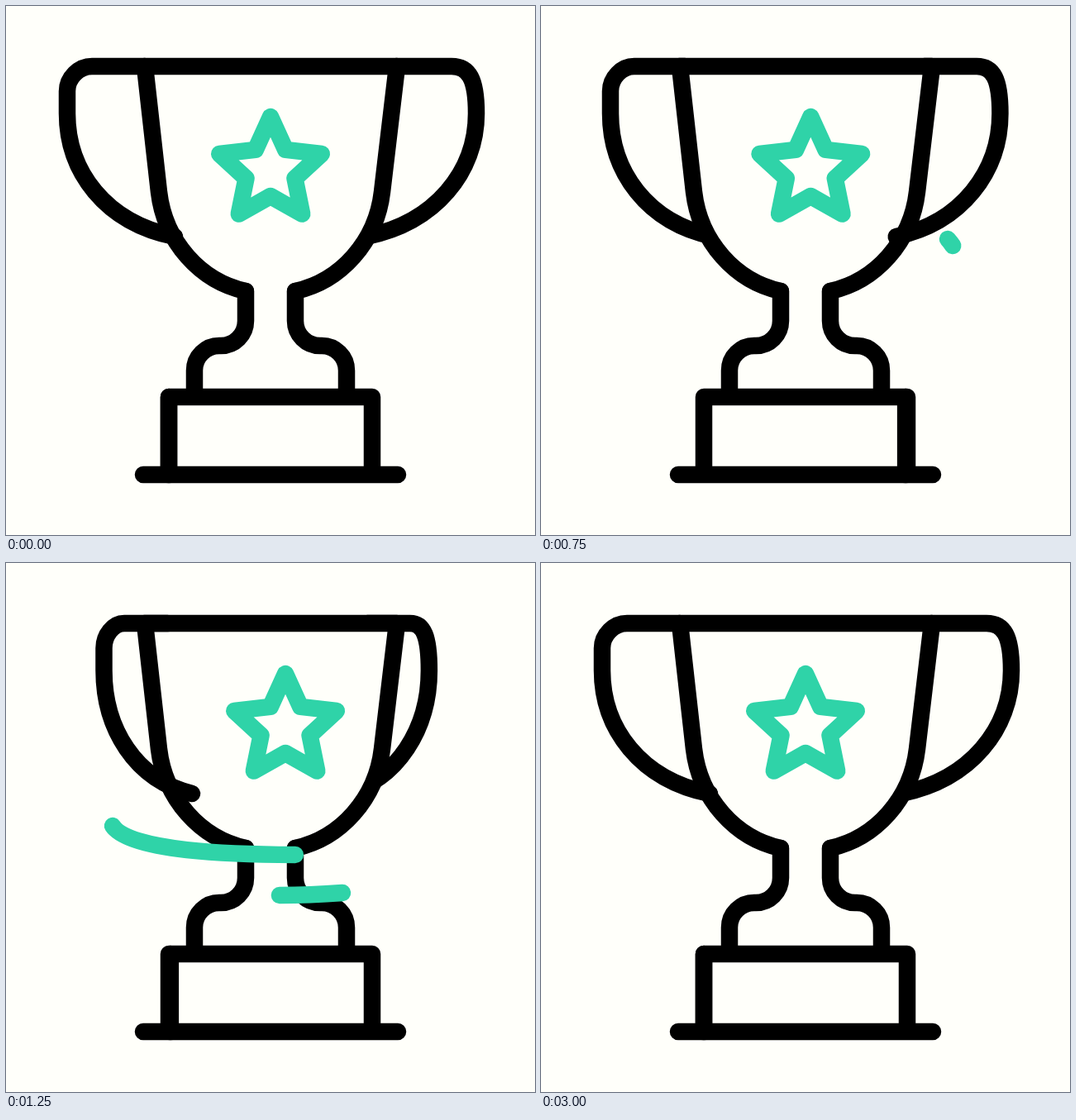
Write an HTML page with a canvas that moves like this. It is 640 px wide and 640 px high and loops after 3080 ms.

```html
<!DOCTYPE html>
<html lang="en">
<head>
<meta charset="utf-8">
<title>Spinning trophy</title>
<style>
  html, body { margin: 0; width: 100%; height: 100%; overflow: hidden; background: #fffffa; }
  canvas { display: block; width: 640px; height: 640px; }
</style>
</head>
<body>
<canvas id="stage" width="640" height="640"></canvas>
<script>
const ctx = document.getElementById('stage').getContext('2d');
const PAPER = '#fffffa', INK = '#000', MINT = '#2fd3a8';
const LOOP = 3080, STEP = 1000 / 12, CX = 320;

const cup = new Path2D('M168 73L185 225C192 285 235 333 290 345H350C405 333 448 285 455 225L473 73Z');
const cupLine = new Path2D('M290 345C235 333 192 285 185 225L168 73H473L455 225C448 285 405 333 350 345');
const stand = new Path2D(
  'M290 345V381A30 30 0 0 1 260 411H258A30 30 0 0 0 228 441V473' +
  'M350 345V381A30 30 0 0 0 380 411H382A30 30 0 0 1 412 441V473' +
  'M197 567V473H443V567M166 567H474');
const upperSwoosh = new Path2D(
  'M492 282C508 300 510 316 490 327C472 338 440 346 415 349C395 351 375 353 355 353C280 353 150 350 129 318');
const lowerSwoosh = new Path2D('M407 399C380 401 355 402 330 402C290 402 260 401 233 397');
const sparkle = new Path2D(
  'M0-45.5A45.5 45.5 0 0 0 45.5 0A45.5 45.5 0 0 0 0 45.5A45.5 45.5 0 0 0-45.5 0A45.5 45.5 0 0 0 0-45.5Z');
const star = new Path2D();
for (let i = 0; i < 10; i++) {
  const r = i % 2 ? 31 : 65, a = i * Math.PI / 5;
  star.lineTo(r * Math.sin(a), -r * Math.cos(a));
}
star.closePath();

// Keys are [step, value, slope]; time is counted in twelfths of a second.
const spinKeys = [[0, 0, 0], [5, 17.5, 10.5], [9, 161, 60], [11, 306, 74], [15, 575, 46], [22, 720, 0]];
const baseKeys = [[0, 0, 0], [5, 28, 15], [9, 170, 55], [11, 302, 66], [15, 550, 50], [22, 720, 0]];
const starKeys = [[0, 0, 0], [5, .032, .02], [9, 1.015, .3], [11, 1.69, .35], [15, 3.043, .26], [22, 4, 0]];

function track(keys, t) {
  const last = keys[keys.length - 1];
  if (t >= last[0]) return last[1];
  const i = keys.findIndex(k => k[0] > t);
  const [t0, v0, m0] = keys[i - 1], [t1, v1, m1] = keys[i];
  const d = t1 - t0, u = (t - t0) / d, w = 1 - u;
  return v0 * w * w * (1 + 2 * u) + m0 * d * u * w * w
       + v1 * u * u * (3 - 2 * u) - m1 * d * u * u * w;
}

const ramp = (t, a, b) => Math.min(1, Math.max(0, (t - a) / (b - a)));
const ease = u => u * u * (3 - 2 * u);
const pulse = (t, a, b, c, d) => ease(ramp(t, a, b)) * (1 - ease(ramp(t, c, d)));
const cosDeg = a => Math.cos(a * Math.PI / 180);

function stroke(path, color) {
  ctx.strokeStyle = color;
  ctx.stroke(path);
}

function handle(turn) {
  const x = r => CX + r * turn;
  const p = new Path2D();
  p.moveTo(x(152), 73);
  if (turn < 0) {
    p.lineTo(x(216), 73);
    p.bezierCurveTo(x(232), 73, x(246), 87, x(246), 103);
    p.lineTo(x(246), 130);
    p.bezierCurveTo(x(246), 200, x(200), 262, x(116), 279);
  } else {
    p.lineTo(x(219), 73);
    p.bezierCurveTo(x(240), 73, x(249), 88, x(249), 130);
    p.bezierCurveTo(x(249), 200, x(200), 262, x(116), 279);
  }
  stroke(p, INK);
}

function swoosh(path, tail, head) {
  if (head - tail < 1) return;
  ctx.setLineDash([head - tail, 9999]);
  ctx.lineDashOffset = -tail;
  stroke(path, MINT);
  ctx.setLineDash([]);
}

function twinkle(x, y, size) {
  if (size < .01) return;
  ctx.save();
  ctx.translate(x, y);
  ctx.scale(size, size);
  stroke(sparkle, MINT);
  ctx.restore();
}

function draw(t) {
  ctx.fillStyle = PAPER;
  ctx.fillRect(0, 0, 640, 640);
  ctx.lineWidth = 20.5;
  ctx.lineCap = ctx.lineJoin = 'round';

  const half = track(spinKeys, t) % 180;
  const lead = 8 * Math.sin(half * Math.PI / 180);
  handle(cosDeg(half + lead));
  ctx.fill(cup);

  const laps = track(starKeys, t) + .5;
  ctx.save();
  ctx.clip(cup);
  ctx.translate(CX + (laps % 1 - .5) * 420, 199);
  stroke(star, MINT);
  ctx.restore();

  stroke(cupLine, INK);
  stroke(stand, INK);
  const edge = CX - 123 * cosDeg(track(baseKeys, t) % 180);
  stroke(new Path2D(`M${edge} 473V567`), INK);
  handle(-cosDeg(half));

  const head = 10 * ramp(t, 8, 9) + 124 * ramp(t, 9, 11) + 296 * ramp(t, 11, 15);
  swoosh(upperSwoosh, 430 * ramp(t, 12, 18.5), head);
  swoosh(lowerSwoosh, 174 * ramp(t, 16, 19), 174 * ramp(t, 13.6, 16.8));

  const side = pulse(t, 21, 24, 24, 27) + pulse(t, 29, 32.5, 32.5, 36);
  twinkle(412.5, 118.5, pulse(t, 22, 27, 29, 35));
  twinkle(194, 363, side);
  twinkle(523, 300, side);
}

function tick() {
  const ms = performance.now() % LOOP;
  draw(Math.floor((ms + 3.4) / STEP));
  requestAnimationFrame(tick);
}
tick();
</script>
</body>
</html>
```
